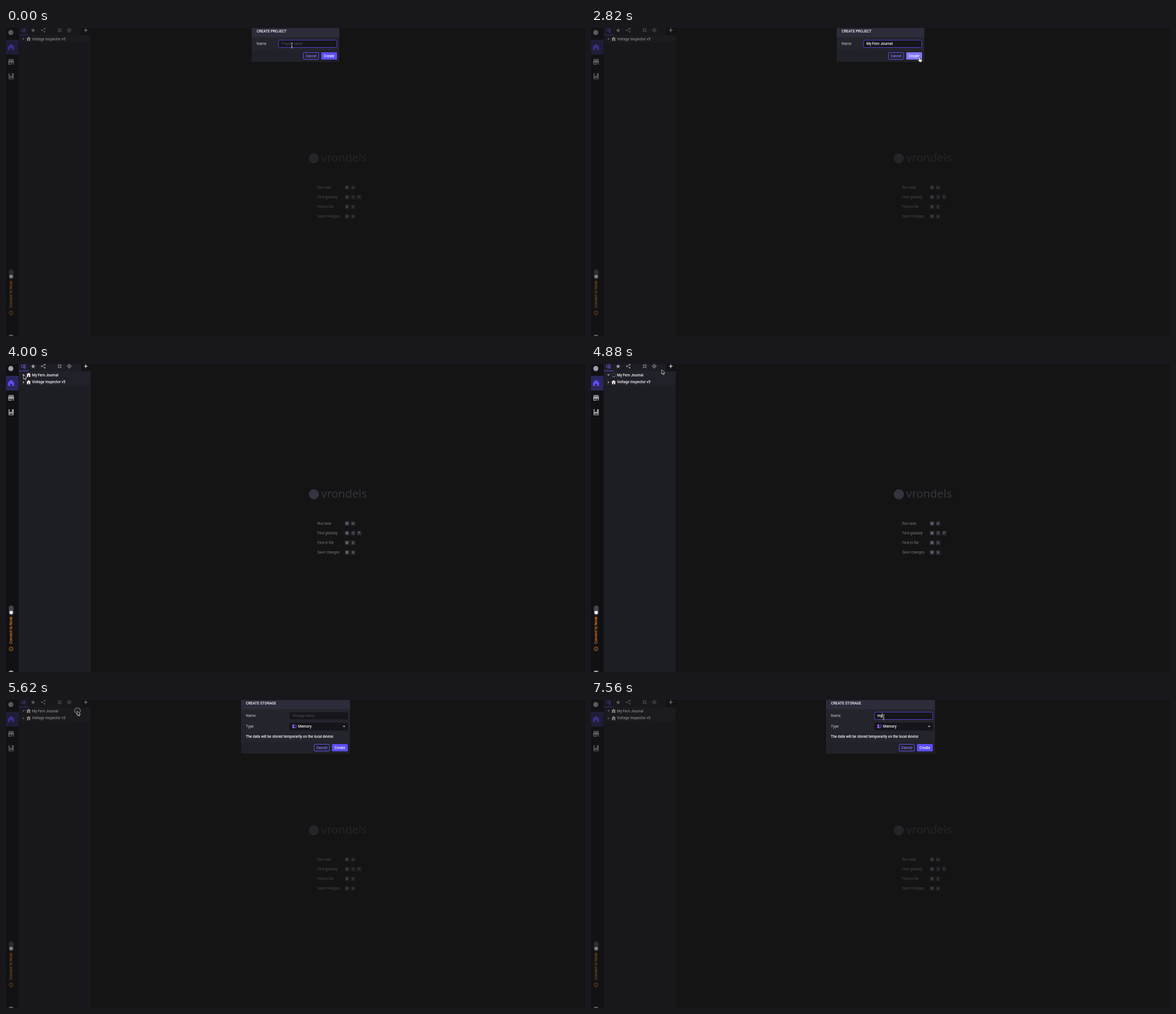
Recreate the animation shown at these times as an HTML page with a canvas. Size 1025x546 px, loop 8 s.

```html
<!DOCTYPE html>
<html lang="en">
<head>
<meta charset="utf-8">
<title>Create project</title>
<style>
html, body { margin: 0; width: 100%; height: 100%; overflow: hidden; background: #141414; }
canvas { display: block; width: 1025px; height: 546px; }
</style>
</head>
<body>
<canvas id="stage"></canvas>
<script>
const W = 1025, H = 546, LOOP = 8000;
const canvas = document.getElementById('stage');
const ctx = canvas.getContext('2d');
const dpr = window.devicePixelRatio || 1;
canvas.width = W * dpr;
canvas.height = H * dpr;

const UI = 'Roboto, sans-serif';
const VIOLET = '#5b4ef5', GREY = '#a3a3aa', WHITE = '#f4f4f6', ORANGE = '#f28322';
const PROJECT = 'My Fern Journal', OTHER = 'Voltage Inspector v5';

const CLOCK = [[0, 0], [9, 1350], [21, 3120], [37, 5470], [54, 8000]];
// Pointer stops: [tick, x, y]
const PATH = [[0, 506, 31], [15, 506, 31], [18, 580, 52], [21, 580, 52], [22, 546.5, 37.5],
  [23, 500, 35], [27, 31, 19], [30, 31, 19], [33, 125, 10], [34, 125, 10], [36, 126, 19.5],
  [39, 126, 19.5], [43, 518, 30.5], [54, 518, 30.5]];
// Typed characters: [tick, count]
const TYPED = [[0, 0], [1, 1], [4, 2], [6, 4], [7, 5], [8, 6], [9, 8], [10, 10], [11, 11],
  [12, 12], [13, 13], [14, 14], [15, 15]];

function tickAt(ms) {
  const t = ms + 6;
  let i = 0;
  while (i < CLOCK.length - 2 && t >= CLOCK[i + 1][1]) i++;
  const [k0, t0] = CLOCK[i], [k1, t1] = CLOCK[i + 1];
  return Math.min(53, Math.floor(k0 + (k1 - k0) * (t - t0) / (t1 - t0)));
}

function pointerAt(k) {
  let i = 0;
  while (i < PATH.length - 2 && k >= PATH[i + 1][0]) i++;
  const [k0, x0, y0] = PATH[i], [k1, x1, y1] = PATH[i + 1];
  const p = (k - k0) / (k1 - k0), e = p * p * (3 - 2 * p);
  return [x0 + (x1 - x0) * e, y0 + (y1 - y0) * e];
}

function rect(x, y, w, h, fill) {
  ctx.fillStyle = fill;
  ctx.fillRect(x, y, w, h);
}

function box(x, y, w, h, r, fill, stroke) {
  ctx.beginPath();
  ctx.roundRect(x, y, w, h, r);
  paint(fill, stroke, 1);
}

function paint(fill, stroke, width) {
  if (fill) { ctx.fillStyle = fill; ctx.fill(); }
  if (stroke) { ctx.strokeStyle = stroke; ctx.lineWidth = width; ctx.stroke(); }
}

function circle(x, y, r, fill, stroke, width = 1) {
  ctx.beginPath();
  ctx.arc(x, y, r, 0, Math.PI * 2);
  paint(fill, stroke, width);
}

// Draws SVG path data relative to (x, y)
function icon(x, y, d, fill, stroke, width = 1) {
  const path = new Path2D(d);
  ctx.save();
  ctx.translate(x, y);
  if (fill) { ctx.fillStyle = fill; ctx.fill(path, 'evenodd'); }
  if (stroke) { ctx.strokeStyle = stroke; ctx.lineWidth = width; ctx.stroke(path); }
  ctx.restore();
}

// Text is placed by its vertical middle
function text(s, x, mid, color, weight = 400, size = 6.45, family = UI, align = 'left') {
  ctx.font = `${weight} ${size}px ${family}`;
  ctx.textAlign = align;
  ctx.fillStyle = color;
  ctx.fillText(s, x, mid + size * 0.355);
}

function drawRail() {
  rect(0, 0, 22.5, H, '#111114');
  circle(8.5, 8, 4.5, '#a09fac');
  rect(0, 21, 22, 26, '#2b275c');
  icon(9, 33.5, 'M0-5.5 5.3-1V5.5H1.6V1.7H-1.6V5.5H-5.3V-1Z', VIOLET);
  icon(9, 60, 'M-4.6-5H4.6V-3.6H-4.6ZM-4.6-2.7H4.6L5.3.4V1.6H4.6V5H3.2V1.6H.8V5H-4.6V1.6H-5.3V.4ZM-3.2 1.6V3.7H-.6V1.6Z', GREY);
  icon(9, 85.5, 'M-4.4-5.3H-2.6V.6L-.5-1 1.6.6V-5.3H4.6V5.3H-4.4ZM-3 2.4V3.9H3.4V2.4Z', GREY);
  box(5, 428, 8.5, 17.5, 4.2, '#454550');
  circle(9.2, 440.5, 3, WHITE);
  ctx.save();
  ctx.translate(9.2, 496);
  ctx.rotate(-Math.PI / 2);
  text('Connect to Node', 0, 0, ORANGE, 500);
  ctx.restore();
  circle(9, 505, 3.4, null, ORANGE, 0.8);
  rect(8.6, 504.3, 0.8, 2.6, ORANGE);
  rect(8.6, 502.9, 0.8, 0.8, ORANGE);
  circle(9, 547.5, 3.8, GREY);
  for (let i = -1; i < 2; i++) rect(8.2 + i * 3, 543 + Math.abs(i), 1.6, 2, GREY);
}

function drawToolbar() {
  rect(133, 0, 17, 12.5, '#131316');
  rect(23, 11.5, 17, 1, VIOLET);
  icon(31, 4, 'M-3.4-3V2.2H.4M-3.4-1.2H.4M.6-2.8H3.2V.2H.6ZM.6 1H3.2V3.6H.6Z', null, '#6c60f6', 0.8);
  ctx.beginPath();
  for (let i = 0; i < 10; i++) {
    const a = -Math.PI / 2 + i * Math.PI / 5, r = i % 2 ? 1.8 : 4.2;
    ctx.lineTo(48 + r * Math.cos(a), 4.2 + r * Math.sin(a));
  }
  paint(GREY);
  icon(66, 4, 'M2.6-2.8-2.6 0 2.6 2.8', null, GREY, 0.7);
  for (const [x, y] of [[68.6, 1.2], [63.3, 4], [68.6, 6.8]]) circle(x, y, 1.2, GREY);
  icon(95, 4, 'M-3.3-3.3-1-1M-1-3.2V-1H-3.2M3.3-3.3 1-1M1-3.2V-1H3.2M-3.3 3.3-1 1M-1 3.2V1H-3.2M3.3 3.3 1 1M1 3.2V1H3.2', null, GREY, 0.8);
  circle(112, 4, 2.7, null, GREY, 0.8);
  circle(112, 4, 0.9, GREY);
  icon(112, 4, 'M0-4.2V-2.7M0 2.7V4.2M-4.2 0H-2.7M2.7 0H4.2', null, GREY, 0.8);
  icon(141.3, 4, 'M-3.3 0H3.3M0-3.3V3.3', null, WHITE, 1.1);
}

function drawRow(y, name, open, spin) {
  rect(23, y - 6.3, 127, 12.6, '#21212a');
  icon(31, y + 0.2, open ? 'M-2.2-1.2H2.2L0 1.6Z' : 'M-1.2-2.2V2.2L1.7 0Z', GREY);
  if (spin === null) {
    icon(40, y, 'M0-3.8 3.9-.2H3V3.6H-3V-.2H-3.9Z', '#e9e6e6');
    rect(39, y + 0.6, 2, 3, '#a85a42');
    rect(42, y - 3.2, 1, 2, '#b0604a');
  } else {
    circle(40, y, 3.4, null, '#3a3a45', 0.9);
    ctx.beginPath();
    ctx.arc(40, y, 3.4, spin, spin + 1.9);
    paint(null, '#8c8c96', 0.9);
  }
  text(name, 46, y, WHITE, 500);
}

function drawWelcome() {
  const dim = '#77777d';
  circle(545, 231, 9, '#34343f');
  text('vrondels', 558, 230.2, '#34343f', 500, 20, '"Noto Sans", sans-serif');
  const rows = [['Run task', '⌘↵'], ['Find globally', '⌘⇧F'], ['Find in file', '⌘F'], ['Save changes', '⌘S']];
  rows.forEach(([label, keys], i) => {
    const y = 282.4 + i * 17.25;
    text(label, 551, y, dim);
    [...keys].forEach((key, j) => {
      const x = 603.7 + j * 10.8;
      box(x - 4, y - 4, 8, 8, 1.5, '#2b2b35');
      const letter = key < 'a';
      text(key, x, y, '#9c9ca6', letter ? 500 : 400, letter ? 4.8 : 6.2, letter ? UI : '"DejaVu Sans", sans-serif', 'center');
    });
  });
}

function drawField(x, value, hint, focused, caret) {
  box(x + 0.5, 21.5, 103, 13, 2, '#15151a', focused ? '#4c41c2' : '#202027');
  text(value || hint, x + 5.5, 27.6, value ? WHITE : '#4b4b53', value ? 500 : 400);
  if (caret) {
    ctx.font = `500 6.45px ${UI}`;
    rect(x + 5.2 + ctx.measureText(value).width, 23.2, 0.8, 8, WHITE);
  }
}

function drawDialog(x, w, h, title, hover) {
  rect(x, 0, w, h, '#24242d');
  rect(x, 0, w, 16.5, '#2d2c3a');
  rect(x, h - 20, w, 20, '#212129');
  text(title, x + 8.8, 6, WHITE, 500);
  text('Name', x + 8.8, 27.5, '#c6c6cc');
  const right = x + w, y = h - 17;
  box(right - 63.5, y + 0.5, 27, 12, 1.5, null, '#5e52ee');
  text('Cancel', right - 50, y + 6.4, '#8379f5', 500, 6.45, UI, 'center');
  box(right - 32, y, 28, 13, 1.5, hover ? '#8177fa' : VIOLET);
  text('Create', right - 18, y + 6.4, WHITE, 500, 6.45, UI, 'center');
}

function drawProjectDialog(k) {
  drawDialog(435, 155, 60, 'CREATE PROJECT', k >= 18);
  const count = TYPED.findLast(([tick]) => tick <= k)[1];
  const caret = k >= 1 && k !== 3 && k < 18;
  drawField(482, PROJECT.slice(0, count), 'Project name', k < 20, caret);
}

function drawStorageDialog(k) {
  drawDialog(416, 193, 95, 'CREATE STORAGE', false);
  const value = k < 49 ? '' : k < 50 ? 'm' : 'my';
  drawField(501.5, value, 'Storage name', k >= 44, k >= 44 && (k < 46 || k >= 49));
  text('Type', 424.8, 47, '#c6c6cc');
  box(501.5, 40, 104, 14, 2, '#15151a');
  icon(510.5, 47, 'M-3.5-3.5H-.5V3H-3.5Z', '#8b5cf0');
  icon(510.5, 47, 'M-.5-2.3H3.3V1.6H-.5M.8 1.6V3.5', null, '#8b5cf0', 0.8);
  text('Memory', 517, 47, WHITE, 500);
  icon(598.5, 47, 'M-2.5-1.3H2.5L0 1.4Z', GREY);
  text('The data will be stored temporarily on the local device', 424.5, 64.6, WHITE, 500);
}

function drawPointer(k) {
  const [x, y] = pointerAt(k);
  if (k >= 37 && k <= 39) circle(126.5, 19, 5, null, '#c4c4c8', 0.8);
  if (k < 16 || k >= 43) {
    const beam = 'M-2-4.5Q0-4.5 0-3.2Q0-4.5 2-4.5M0-3.2V3.2M-2 4.5Q0 4.5 0 3.2Q0 4.5 2 4.5M-1 1.5H1';
    icon(x, y, beam, null, '#111', 1.8);
    icon(x, y, beam, null, '#d8d8d8', 0.8);
  } else if (k >= 18 && k < 22) {
    icon(x, y, 'M0 0Q1-.8 1.7.2L2.6 3 5.3 3.7Q6.3 4 6 5.2L5.6 8.6H2L-1.4 5.3Q-1.8 4.3-.6 4.2L.8 4.9-.5 1Q-.5.3 0 0Z', '#fff', '#111', 0.7);
  } else {
    icon(x, y, 'M0 0V8L1.9 6.3 3.2 9.2 4.6 8.6 3.3 5.8H5.8Z', '#0c0c0c', '#e4e4e4', 0.8);
  }
}

function draw(ms) {
  const k = tickAt(ms);
  const created = k >= 22, modal = k < 22 || k >= 38;
  ctx.setTransform(dpr, 0, 0, dpr, 0, 0);
  rect(0, 0, W, H, '#141414');
  drawRail();
  rect(22.5, 0, 127.5, H, '#1d1d24');
  drawToolbar();
  if (created) {
    const loading = k >= 30 && k < 37;
    drawRow(19.3, PROJECT, k >= 29, loading ? 0.4 + (k - 33) * 1.3 : null);
  }
  drawRow(created ? 32.2 : 19.3, OTHER, false, null);
  drawWelcome();
  if (modal) {
    rect(0, 0, W, H, 'rgba(20, 20, 20, 0.5)');
    if (k < 22) drawProjectDialog(k);
    else drawStorageDialog(k);
  }
  drawPointer(k);
}

const start = performance.now();
function loop() {
  draw((performance.now() - start) % LOOP);
  requestAnimationFrame(loop);
}
loop();
</script>
</body>
</html>
```
